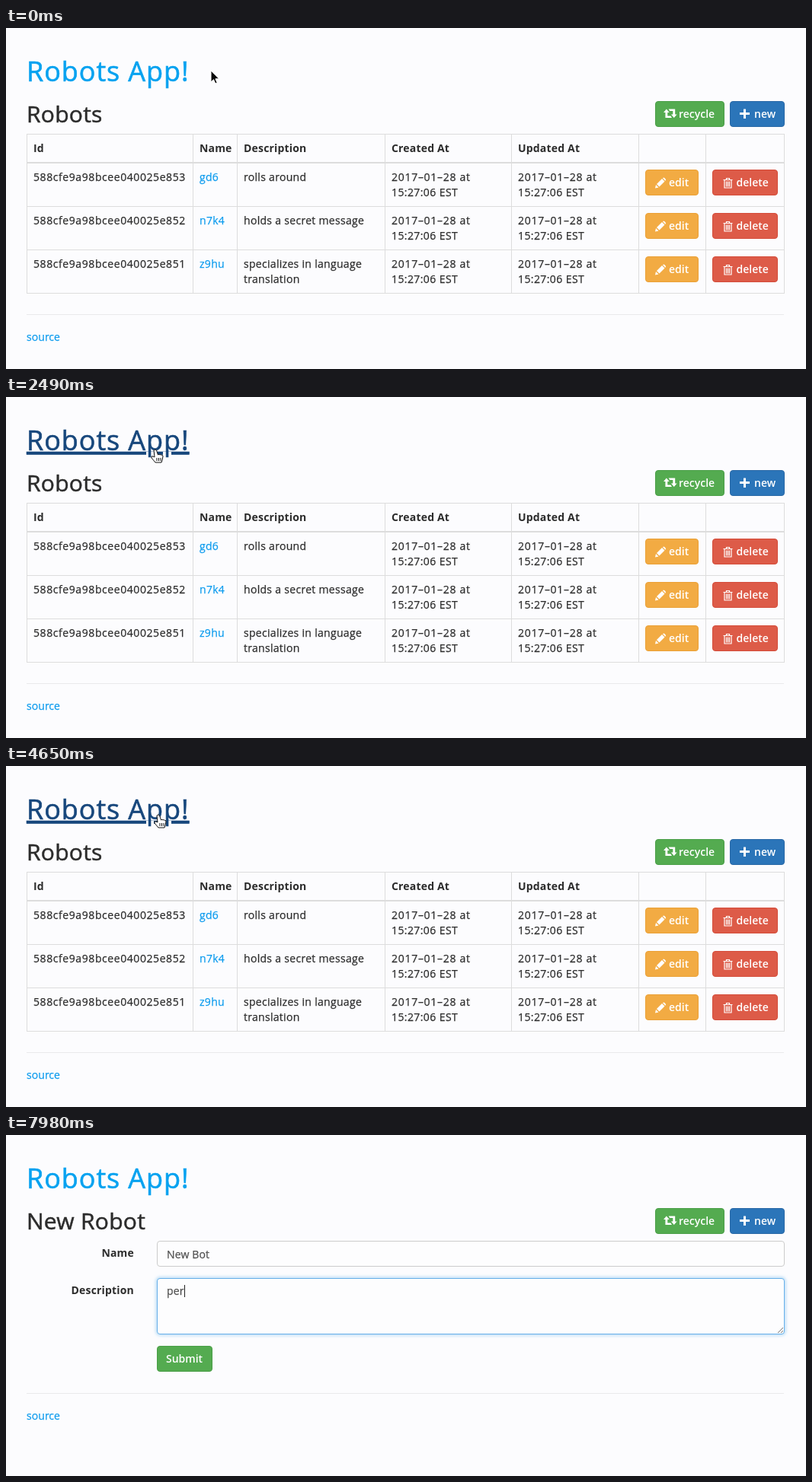
These frames come from a looping animation (1050x448 px, 8000 ms). An HTML page:

```html
<!DOCTYPE html>
<html lang="en">
<head>
<meta charset="utf-8">
<title>Robots App</title>
<style>
html, body { margin: 0; width: 100%; height: 100%; overflow: hidden; background: #fcfcfe; }
svg { display: block; width: 1050px; height: 448px; }
text { font: 14px "Open Sans", "Noto Sans", sans-serif; letter-spacing: .3px; color: #2c2c2c; fill: currentColor; stroke: currentColor; stroke-width: .25px; white-space: pre; }
.h1 { font-size: 36px; letter-spacing: .9px; color: #06a2f0; stroke-width: .6px; }
.h2 { font-size: 30px; letter-spacing: .25px; stroke-width: .5px; }
.h2.long { letter-spacing: 1px; }
.b { font-weight: 700; letter-spacing: .18px; stroke: none; }
.end { text-anchor: end; }
.id { letter-spacing: .58px; }
.day { letter-spacing: .72px; }
.time { letter-spacing: .4px; }
.link { color: #0e9cee; }
.foot { letter-spacing: .05px; }
.on { color: #17477c; text-decoration: underline; text-decoration-skip-ink: none; }
.h1.on { text-decoration-thickness: 2px; }
.btn { font-weight: 600; letter-spacing: 0; color: #fff; stroke: none; }
.hint { color: #999; }
.val { color: #505050; letter-spacing: .15px; }
.line { fill: none; stroke: #ddd; }
.rule { fill: none; stroke: #eaeaec; }
.grip { fill: none; stroke: #777; }
</style>
</head>
<body>
<svg viewBox="0 0 1050 448">
  <defs><filter id="glow" x="-2%" y="-20%" width="104%" height="140%"><feGaussianBlur stdDeviation="2"/></filter></defs>
  <g id="page"></g>
  <g id="cursor"></g>
</svg>
<script>
const LOOP = 8000;
const page = document.getElementById("page");
const cursor = document.getElementById("cursor");

const ROBOTS = [
  ["588cfe9a98bcee040025e853", "gd6", ["rolls around"]],
  ["588cfe9a98bcee040025e852", "n7k4", ["holds a secret message"]],
  ["588cfe9a98bcee040025e851", "z9hu", ["specializes in language", "translation"]]
];

// Button colours: fill, edge
const GREEN = ["#54ab50", "#4a9e48"], BLUE = ["#2b75b9", "#2968a6"], NAVY = ["#265f8e", "#122b40"];
const AMBER = ["#f2ab43", "#eba036"], RED = ["#dd5b48", "#d44c3a"];

// Pointer path: time, x, y
const PATH = [
  [0, 269, 56], [800, 269, 56], [1500, 196, 69], [2500, 196, 69],
  [3150, 191, 258], [3450, 263, 311], [3750, 263, 311], [3990, 260, 297],
  [4450, 200, 64], [4800, 200, 64], [5310, 709, 180], [5650, 990, 116],
  [5860, 990, 116], [6240, 263, 156], [8000, 263, 156]
];

// Clicks and key presses
const HOME = 1750, OPEN = 3700, BACK = 4600, NEW = 5800, FOCUS = 6400, TYPE = 6650, TAB = 7550, TYPE2 = 7700;

const ICONS = {
  recycle: '<path transform="scale(1.1 1)" d="M3.5 0 7 4.5H4.8V9H8.5L10 11.5H2.2V4.5H0ZM12.5 11.5 16 7H13.8V0H6L7.5 2.5H11.2V7H9Z"/>',
  plus: '<path d="M5 0h3v4.5h5v3H8v5H5v-5H0v-3h5z"/>',
  pencil: '<path d="M0 14 1 9.5 4.5 13ZM2 8.5 9 1.5 12.5 5 5.5 12ZM10 .7 11 0Q14 1 14 3.5L13.2 4.2Z"/>',
  trash: '<path fill="none" stroke="#fff" stroke-width="1.2" d="M0 3H12M4 3V1H8V3M1.5 3.5V13.5H10.5V3.5M4 5V12M6 5V12M8 5V12"/>'
};

const POINTERS = {
  arrow: '<path d="M0 0V15L3.5 11.7 5.8 17 8.2 16 5.9 10.8H10.6Z" fill="#080808" stroke="#fff"/>',
  hand: '<path d="M-2 1Q0-1 1.5 1L3.5 7Q5 5.5 6 7 7.5 6 8.2 7.5 10 7 10 9L9 14 8 17H0L-5 11Q-6 8-3 9L-1 10Z" fill="#fff" stroke="#111"/><path d="M2 11V15M4.5 11V15M7 11V15" stroke="#111"/>',
  beam: '<path d="M-3-7.5Q0-7.5 0-5.5 0-7.5 3-7.5M0-6V6M-3 7.5Q0 7.5 0 5.5 0 7.5 3 7.5M-1.5 2H1.5" fill="none" stroke="#111" stroke-width="1.2"/>'
};

const text = (x, y, s, cls = "") => `<text x="${x}" y="${y}" class="${cls}">${s}</text>`;
const path = (d, cls) => `<path d="${d}" class="${cls}"/>`;
const inside = (p, x0, y0, x1, y1) => p.x >= x0 && p.x <= x1 && p.y >= y0 && p.y <= y1;

function button(x, y, w, [fill, edge], label, lx, icon, ix) {
  const mark = icon ? `<g transform="translate(${ix} ${y + 10.5})" fill="#fff">${ICONS[icon]}</g>` : "";
  return `<rect x="${x + .5}" y="${y + .5}" width="${w - 1}" height="33" rx="3.5" fill="${fill}" stroke="${edge}"/>`
    + mark + text(lx, y + 22, label, "btn");
}

function header(s, title) {
  return text(27, 70, "Robots App!", "h1" + (s.titleOn ? " on" : ""))
    + text(27, 124, title, "h2" + (title.length > 12 ? " long" : ""))
    + button(852, 96, 91, GREEN, "recycle", 883, "recycle", 863)
    + button(950, 96, 72, s.newOn ? NAVY : BLUE, "new", 982, "plus", 963);
}

const footer = y => path(`M27 ${y + .5}H1021`, "rule") + text(27, y + 35, "source", "link foot");

function table(s, rows) {
  const end = 177.5 + 57 * rows.length;
  let out = "";
  if (s.row >= 0) out += `<rect x="28" y="${178 + 57 * s.row}" width="993" height="56" fill="#f5f5f5"/>`;
  const columns = [27.5, 245.5, 303.5, 497.5, 663.5, 830.5, 918.5, 1021.5];
  out += path(columns.map(x => `M${x} 139V${end}`).join("") + "M27 139.5H1022M27 176.5H1022M27 177.5H1022", "line");
  [["Id", 36], ["Name", 254], ["Description", 312], ["Created At", 506], ["Updated At", 672]]
    .forEach(([label, x]) => out += text(x, 163, label, "b"));
  rows.forEach(([id, name, words], i) => {
    const y = 201 + 57 * i;
    out += path(`M27 ${y + 33.5}H1022`, "line")
      + text(36, y, id, "id") + text(254, y, name, "link" + (s.nameOn === i ? " on" : ""));
    words.forEach((line, k) => out += text(312, y + 20 * k, line));
    for (const x of [506, 672])
      out += text(x, y, "2017–01–28 at", "day") + text(x, y + 20, "15:27:06 EST", "time");
    out += button(839, y - 15, 70, AMBER, "edit", 870, "pencil", 852)
      + button(927, y - 15, 86, RED, "delete", 958.5, "trash", 941.5);
  });
  return out + footer(end + 28.5 - .5 - .5);
}

function field(y, h, value, hint, active) {
  const box = `x="198.5" y="${y + .5}" width="823" height="${h - 1}" rx="3.5"`;
  return (active ? `<rect ${box} fill="none" stroke="#9fd0f2" stroke-width="3" filter="url(#glow)"/>` : "")
    + `<rect ${box} fill="#fdfdfe" stroke="${active ? "#66afe9" : "#ccc"}"/>`
    + text(211, y + (h > 40 ? 22 : 23), value || hint, (value ? "val" : "hint") + (active ? " typed" : ""))
    + (active ? `<rect id="caret" y="${y + 9}" width="1" height="16" fill="#222"/>` : "");
}

function form(s) {
  return text(168, 160, "Name", "b end") + text(168, 209, "Description", "b end")
    + field(139, 34, s.name, "My Robot", s.field === 1)
    + field(188, 74, s.note, "All the things...", s.field === 2)
    + path("M1013 260 1020 253M1017 260 1020 257", "grip")
    + button(198, 277, 73, GREEN, "Submit", 210)
    + footer(339);
}

// Smooth curve through the pointer path, at rest where it turns
function pointerAt(t) {
  let i = 0;
  while (i < PATH.length - 2 && t >= PATH[i + 1][0]) i++;
  const a = PATH[i], b = PATH[i + 1], dt = b[0] - a[0], u = (t - a[0]) / dt;
  const slope = (j, k) => {
    if (j < 1 || j > PATH.length - 2) return 0;
    const [p, q, r] = [PATH[j - 1], PATH[j], PATH[j + 1]];
    const m = (q[k] - p[k]) / (q[0] - p[0]), n = (r[k] - q[k]) / (r[0] - q[0]);
    return m * n > 0 ? 2 * m * n / (m + n) : 0;
  };
  const mix = k => {
    const v = 1 - u;
    return a[k] * v * v * (1 + 2 * u) + b[k] * u * u * (3 - 2 * u)
      + dt * (slope(i, k) * u * v * v - slope(i + 1, k) * u * u * v);
  };
  return { x: mix(1), y: mix(2) };
}

function pointerKind(p, view, rows) {
  if (inside(p, 28, 40, 241, 78) || inside(p, 852, 96, 943, 130) || inside(p, 950, 96, 1022, 130)) return "hand";
  if (inside(p, 28, 98, view === "show" ? 568 : 150, 130)) return "beam";
  if (view === "form")
    return inside(p, 198, 139, 1022, 262) ? "beam" : inside(p, 198, 277, 271, 311) ? "hand" : "arrow";
  const y = (p.y - 177) % 57;
  if (p.y < 177 || p.y > 177 + 57 * rows) return "arrow";
  if (p.x > 254 && p.x < 288 && y > 10 && y < 28) return "hand";
  const words = [[36, 236, 28], [312, 470, 28], [506, 610, 48], [672, 776, 48]];
  return words.some(([a, b, h]) => p.x > a && p.x < b && y > 10 && y < h) ? "beam" : "arrow";
}

const typed = (s, t, start, step) => s.slice(0, Math.max(0, Math.floor((t - start) / step) + 1));

let shown = "", kindShown = "";

function draw(t) {
  const p = pointerAt(t);
  const view = t >= NEW ? "form" : t >= OPEN && t < BACK ? "show" : "list";
  const rows = view === "show" ? ROBOTS.slice(2) : ROBOTS;
  const row = Math.floor((p.y - 177) / 57);
  const onRow = view !== "form" && row >= 0 && row < rows.length && p.x > 27 && p.x < 1022;
  const kind = t > TYPE ? "" : pointerKind(p, view, rows.length);
  const s = {
    titleOn: inside(p, 28, 40, 241, 78) || (t >= HOME && t < OPEN) || (t >= BACK && t < NEW),
    newOn: inside(p, 950, 96, 1022, 130) || (t >= NEW && t < FOCUS),
    row: onRow ? row : -1,
    nameOn: view === "show" ? 0 : onRow && kind === "hand" && p.x < 300 ? row : -1,
    field: t < FOCUS ? 0 : t < TAB ? 1 : 2,
    name: typed("New Bot", t, TYPE, 110),
    note: typed("per", t, TYPE2, 110)
  };
  const title = view === "form" ? "New Robot" : view === "show" ? "Robot #" + rows[0][0] : "Robots";
  const html = header(s, title) + (view === "form" ? form(s) : table(s, rows));
  if (html !== shown) {
    page.innerHTML = shown = html;
    const caret = document.getElementById("caret");
    if (caret) {
      const el = page.querySelector(".typed");
      const w = el.classList.contains("val") ? el.getComputedTextLength() : 0;
      caret.setAttribute("x", Math.round(211 + w));
    }
  }
  if (kind !== kindShown) cursor.innerHTML = POINTERS[kindShown = kind] || "";
  cursor.setAttribute("transform", `translate(${p.x.toFixed(1)} ${p.y.toFixed(1)})`);
}

const start = performance.now();
function tick() {
  draw((performance.now() - start) % LOOP);
  requestAnimationFrame(tick);
}
tick();
</script>
</body>
</html>
```
